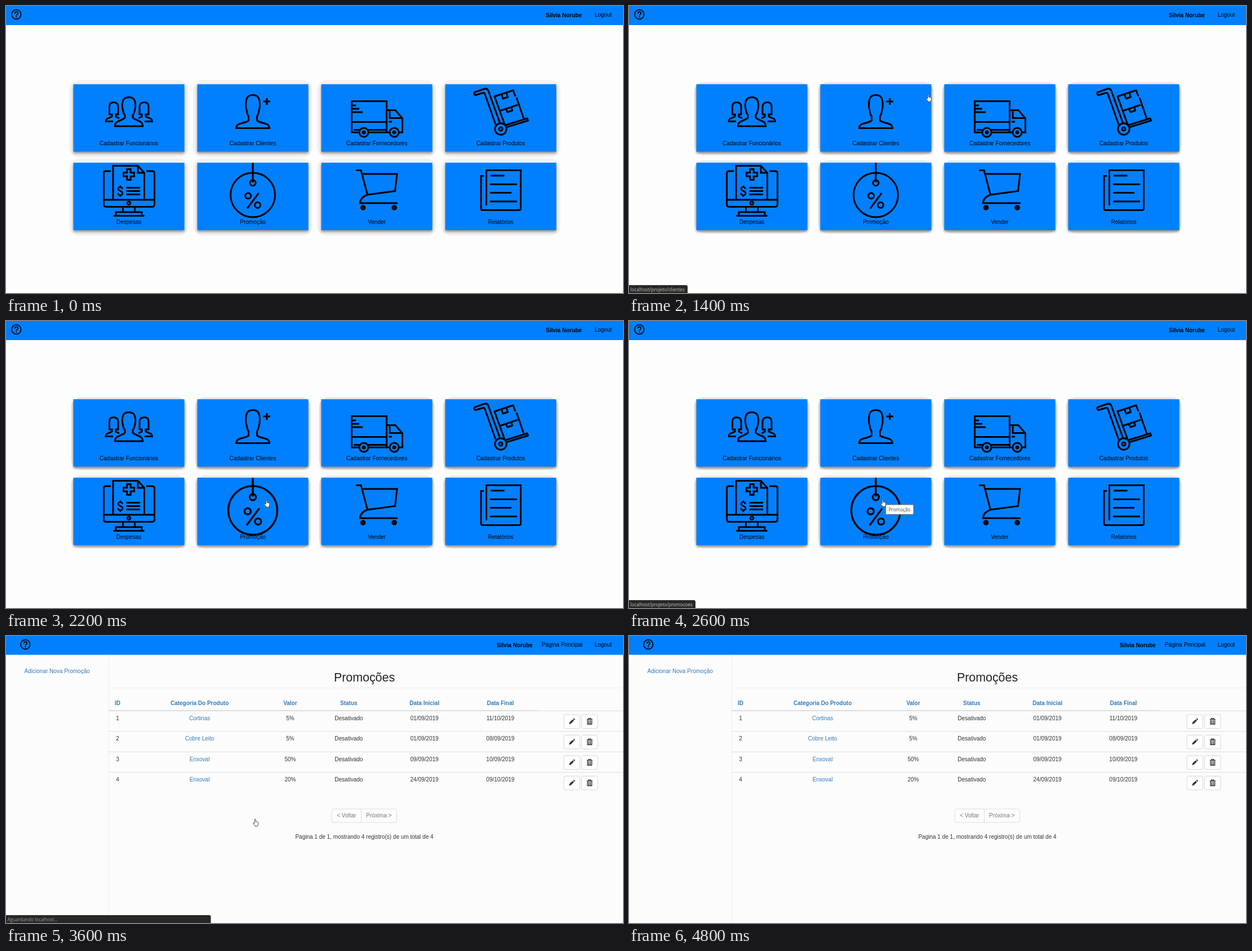
Write an HTML page that moves like this. It is 1095 px wide and 511 px high and loops after 5 s.

```html
<!DOCTYPE html>
<html lang="pt-BR">
<head>
<meta charset="utf-8">
<title>Promoções</title>
<style>
  html, body { margin: 0; width: 100%; height: 100%; overflow: hidden; background: #fdfdfd; }
  svg { display: block; width: 1095px; height: 511px; }
  text { font: 10px "Liberation Sans", Arial, sans-serif; }
  .bold { font-weight: bold; }
  .mid { text-anchor: middle; }
  .link { fill: #337ab7; }
  .ui { font: 8.15px "Open Sans", "Noto Sans", sans-serif; }
  .icon { fill: none; stroke: #000; stroke-width: 3; }
  .rule { stroke: #ddd; fill: none; }
</style>
</head>
<body>
<svg viewBox="0 0 1095 511">
  <defs>
    <filter id="soft" x="-10%" y="-10%" width="120%" height="125%"><feGaussianBlur stdDeviation="2"/></filter>
    <clipPath id="promoClip"><rect x="339.5" y="279" width="197" height="120"/></clipPath>
    <g id="help">
      <circle r="8.3" fill="none" stroke="#000" stroke-width="1.8"/>
      <path d="M-2.7-1.8C-2.7-5.6 2.9-5.6 2.9-2C2.9 0 .1 0 .1 2.2" fill="none" stroke="#000" stroke-width="1.8"/>
      <circle cx=".1" cy="4.4" r="1.1"/>
    </g>
    <g id="pencil" fill="#333">
      <path d="M-5 5L-4 1.6L1.4-3.6L3.8-1.2L-1.6 4ZM2.2-4.4L3.2-5.3Q4-5.6 5.2-4.4Q5.8-3.6 5.4-2.8L4.5-2Z"/>
    </g>
    <g id="trash" fill="none" stroke="#333">
      <path d="M-5-3.5H5M-2-4V-5.3H2V-4" stroke-width="1.3"/>
      <path d="M-3.8-2.5V5H3.8V-2.5M-1.4-2V4.5M1.4-2V4.5" stroke-width="1.4"/>
    </g>
  </defs>

  <g id="home">
    <rect width="1095" height="511" fill="#fdfdfd"/>
    <rect width="1095" height="34" fill="#0080ff"/>
    <use href="#help" x="18.3" y="15"/>
    <text class="bold" x="958" y="20">Silvia Norube</text>
    <text x="1044.7" y="19">Logout</text>
    <g id="halos"></g>
    <g id="cards"></g>

    <g class="icon">
      <path d="M190 205.5H177C177 199 184 200 188 196.500V193H183.500V179C183.500 173.500 187 171.500 191 171.500C196 171.500 199 174.500 199 180V193H195V197L201 200"/>
      <path d="M246 205.500H259.500C259.500 199 252 200 248 196.500V193H253V179C253 173.500 250 171.500 245.500 171.500C240 171.500 237 174.500 237 180V193H241V197L235 200"/>
      <path d="M193.500 214H242.500C242.500 203 232 206 225 199V194C229 190 227.500 187 229.500 181C230.500 168 227 162.500 218 162.500C209 162.500 205.500 168 206.500 181C208.500 187 207 190 211 194V199C204 206 193.500 203 193.500 214Z"/>
    </g>

    <g id="client" class="icon">
      <path d="M408.500 217.500H467.500C467.500 207 453 210 445.500 204V196C449.500 192 447.500 188 450 182C451.500 165 448 158.500 438 158.500C428 158.500 424.500 165 426 182C428.500 188 426.500 192 430.500 196V204C423 210 408.500 207 408.500 217.500Z"/>
      <path d="M456.500 170H469M462.800 164V176"/>
    </g>

    <g class="icon">
      <path d="M626 225H613.500V169.500H675.500V225H644M613 206.500H675.500M613 177H621M613 183H627M613 189H633M617 220.500H627M643 220.500H674"/>
      <path d="M675.500 185.500H691L703.500 200V225H698M680 225H676M681 186V199.500H702M679 206H685"/>
      <circle cx="635" cy="225" r="8"/><circle cx="635" cy="225" r="2"/>
      <circle cx="689" cy="225" r="8"/><circle cx="689" cy="225" r="2"/>
    </g>

    <g class="icon" stroke-linejoin="round">
      <path d="M830.500 154L849 147.500Q854 146 856 151L876.500 208M832 159L847 154.500Q849 154 850 157L869 211M830.500 154L832 159M889 215.500L926.500 204L925 200L886.500 212"/>
      <path d="M904 161L900 150L867 161L885 211M906 163L919 201M875.500 187L908 176"/>
      <path d="M879.500 157.500L882 165L890.500 162L888 154.500M887.500 184L890 189L898.500 186L896 179"/>
      <circle cx="878" cy="219" r="10.200"/><circle cx="878" cy="219" r="3"/>
    </g>

    <g class="icon">
      <path d="M186 294H177Q173.500 294 173.500 298V353Q173.500 357.500 178 357.500H259Q263.500 357.500 263.500 353V298Q263.500 294 259 294H249M173 345H264"/>
      <path d="M190 345V284.500H234L245.500 297V345M234 284.500V297H245.500"/>
      <path d="M214.800 290.500H221.200V296.800H227.500V303.200H221.200V309.500H214.800V303.200H208.500V296.800H214.800Z"/>
      <path d="M213.500 323.500H238M213.500 329.500H238M213.500 335.500H238"/>
      <path d="M206.500 326C206 321 199 321.500 199 325.500C199 330 207 329 207 333.500C207 338 199 338 198.500 333M202.800 319.500V323M202.800 336V340" stroke-width="2.600"/>
      <circle cx="218" cy="351" r="2.800"/>
      <path d="M207.500 358V367M228.500 358V367M195 373V367H241V373M190.500 373.500H245.500"/>
    </g>

    <g clip-path="url(#promoClip)"><g id="promo" class="icon">
      <path d="M438 270V314M448.500 333L428 360.500"/>
      <circle cx="438" cy="336.500" r="39.500"/>
      <circle cx="438" cy="315" r="5"/>
      <circle cx="429.700" cy="338" r="5"/>
      <circle cx="446.500" cy="354.500" r="5"/>
    </g></g>

    <g class="icon">
      <path d="M621 292.500H630L641.500 336L690.500 329.500L694 299H632M641.500 336C631 340 628.500 345 628.500 351H695"/>
      <circle cx="633.500" cy="359" r="3.300"/><circle cx="689" cy="359" r="3.300"/>
      <path d="M632 359H635M687.500 359H690.500"/>
    </g>

    <g class="icon">
      <path d="M852.500 355V292.500H913.500V361Q913.500 363.500 910 363.500H846Q843 363.500 843 360V302.500H848"/>
      <path d="M860 302H884.500M859 317.500H907M859 332.500H897M859 348H907"/>
    </g>
    <g id="labels" class="mid"></g>
  </g>

  <g id="list">
    <rect width="1095" height="511" fill="#fcfcfc"/>
    <path class="rule" d="M182 34V511M182 92.500H1095" style="stroke:#eee"/>
    <rect width="1095" height="33.500" fill="#0080ff"/>
    <use href="#help" x="34.300" y="15"/>
    <text class="bold" x="870.700" y="20">Silvia Norube</text>
    <text x="950.800" y="19">Página Principal</text>
    <text x="1044.700" y="19">Logout</text>
    <text class="link" x="32.600" y="65.500">Adicionar Nova Promoção</text>
    <text class="mid" x="636" y="81" fill="#222" style="font-size:21.400px">Promoções</text>
    <path class="rule" d="M182 132.800H943" stroke-width="1.500"/>
    <g id="table" fill="#333"></g>
    <rect class="rule" x="578" y="308" width="115.500" height="24" rx="3"/>
    <path class="rule" d="M630.500 308V332"/>
    <g class="mid" fill="#777"><text x="604.300" y="323">&lt; Voltar</text><text x="661.700" y="323">Próxima &gt;</text></g>
    <text class="mid" x="636" y="360.500" fill="#333">Pagina 1 de 1, mostrando 4 registro(s) de um total de 4</text>
  </g>

  <g id="status">
    <path id="statusBox" fill="#282828"/>
    <text id="statusText" class="ui" x="2.500" y="507.500"/>
  </g>
  <g id="tooltip">
    <rect x="455.500" y="327" width="49.500" height="17.500" fill="#fff" stroke="#666"/>
    <text class="ui mid" x="480" y="338.700" fill="#444">Promoção</text>
  </g>
  <g id="cursor" fill="#fff" stroke="#222" stroke-width=".8" stroke-linejoin="round">
    <path id="arrow" d="M.4.400V9.200L2.300 7.500L3.700 10.700L5 10.100L3.600 7H6Z"/>
    <path id="hand" d="M3.200 8.500V1.600Q4.200-.2 5.200 1.600V5.500Q6.300 4.600 6.900 5.800Q8 5.100 8.500 6.300Q9.600 5.900 9.700 7.200V10Q9.500 11.500 8.700 12.200V13.600H3.700V12.400L.6 8.700Q.3 7.200 1.600 7.300Z"/>
  </g>
</svg>
<script>
const $ = id => document.getElementById(id);
const LOOP = 5000, STEP = 100;
const CARD = { w: 197, h: 120 };
const labels = ["Cadastrar Funcionários", "Cadastrar Clientes", "Cadastrar Fornecedores", "Cadastrar Produtos",
  "Despesas", "Promoção", "Vender", "Relatórios"];
const cards = labels.map((label, i) => ({ label, x: 119.5 + 220 * (i % 4), y: i < 4 ? 139.3 : 279 }));

const text = (x, y, value, cls = "mid") => `<text class="${cls}" x="${x}" y="${y}">${value}</text>`;
const box = (x, y, w, h, attrs) => `<rect x="${x}" y="${y}" width="${w}" height="${h}" ${attrs}/>`;

function drawHalos(spread, bottom, color) {
  $("halos").innerHTML = cards.map(({ x, y }) =>
    box(x - spread, y - spread, CARD.w + 2 * spread, CARD.h + spread + bottom, `rx="18" fill="${color}"`)).join("");
}

$("cards").innerHTML = cards.map(({ x, y }) =>
  box(x, y + 3, CARD.w, CARD.h, 'fill="#000" opacity=".42" filter="url(#soft)"') +
  box(x, y, CARD.w, CARD.h, 'fill="#0080ff"')).join("");
$("labels").innerHTML = cards.map(({ x, y, label }) => text(x + 98.5, y + 108.5, label)).join("");

const columns = [198, 343.6, 504.4, 608.3, 742.6, 877.4];
const heads = ["ID", "Categoria Do Produto", "Valor", "Status", "Data Inicial", "Data Final"];
const rows = [
  [1, "Cortinas", "5%", "Desativado", "01/09/2019", "11/10/2019"],
  [2, "Cobre Leito", "5%", "Desativado", "01/09/2019", "08/09/2019"],
  [3, "Enxoval", "50%", "Desativado", "09/09/2019", "10/09/2019"],
  [4, "Enxoval", "20%", "Desativado", "24/09/2019", "09/10/2019"]
];
const button = (x, y, icon) => box(x, y - 12, 28.4, 24.5, 'rx="3" fill="#fff" stroke="#ccc" stroke-width=".8"') +
  `<use href="#${icon}" x="${x + 14.2}" y="${y}"/>`;
$("table").innerHTML = heads.map((head, c) => text(columns[c], 122.6, head, "mid bold link")).join("") +
  rows.map((row, r) => {
    const dy = 36.5 * r;
    return `<path class="rule" d="M182 ${133.3 + dy}H1095"/>` +
      row.map((cell, c) => text(columns[c], 149.6 + dy, cell, c === 1 ? "mid link" : "mid")).join("") +
      button(990, 152 + dy, "pencil") + button(1021.6, 152 + dy, "trash");
  }).join("");

// Pointer track: time, left, top
const track = [
  [200, 156, 0], [400, 432, 54], [500, 432, 54], [700, 433, 150], [900, 480, 172], [1000, 525, 159],
  [1100, 525, 155], [1600, 528, 158], [1700, 545, 157], [1800, 546, 314], [1900, 538, 318], [2200, 458, 318],
  [2300, 446, 317], [2600, 446, 317], [2900, 438, 325], [3700, 438, 325], [3900, 190, 90], [4000, 120, 8],
  [4300, 316, 169], [4400, 316, 169], [4700, 76, 2]
];

function pointerAt(t) {
  const next = track.findIndex(key => key[0] > t);
  if (next < 1) return (next ? track[track.length - 1] : track[0]).slice(1);
  const [t0, x0, y0] = track[next - 1], [t1, x1, y1] = track[next];
  const k = (t - t0) / (t1 - t0);
  return [x0 + (x1 - x0) * k, y0 + (y1 - y0) * k];
}

const show = (id, on) => { $(id).style.display = on ? "" : "none"; };

function zoom(id, cy, on) {
  $(id).setAttribute("transform", on ? `translate(438 ${cy}) scale(1.1) translate(-438 ${-cy})` : "");
}

function statusAt(t) {
  if (t >= 1200 && t < 2000) return ["localhost/projeto/clientes", 104, t < 1800 ? 1 : t < 1900 ? 0.55 : 0.15, "#c8c8c8"];
  if (t >= 2400 && t < 3500) return ["localhost/projeto/promocoes", 118, 1, "#c8c8c8"];
  if (t >= 3500 && t < 3800) return ["Aguardando localhost...", 363.5, 1, "#a0a0a0"];
  return ["", 0, 0, "#000"];
}

let wide = null;
function render(time) {
  const t = Math.floor(time % LOOP / STEP) * STEP;
  const home = t < 3600;
  show("home", home);
  show("list", !home);

  if (wide !== t < 200) {
    wide = t < 200;
    if (wide) drawHalos(7.5, 10, "#f2f2f2");
    else drawHalos(4, 5.5, "#e9e9e9");
  }

  const [x, y] = pointerAt(t);
  const overCard = cards.some(c => x + 4 > c.x && x + 4 < c.x + CARD.w && y > c.y && y < c.y + CARD.h);
  const hand = home ? overCard : t < 3800;
  show("cursor", t >= 200 && t < 4800);
  show("hand", hand);
  show("arrow", !hand);
  $("cursor").setAttribute("transform", `translate(${x} ${y})`);

  const overImage = x + 4 > 388 && x + 4 < 488;
  zoom("client", 189, overImage && y > 139 && y < 239);
  zoom("promo", 329, overImage && y > 279 && y < 379);

  const [message, width, opacity, color] = statusAt(t);
  $("status").setAttribute("opacity", opacity);
  $("statusBox").setAttribute("d", width ? `M0 497H${width - 3}Q${width} 497 ${width} 500V511H0Z` : "");
  $("statusText").textContent = message;
  $("statusText").setAttribute("fill", color);
  show("tooltip", t >= 2600 && t < 3100);
}

const start = performance.now();
function tick() {
  render(performance.now() - start);
  requestAnimationFrame(tick);
}
tick();
</script>
</body>
</html>
```
